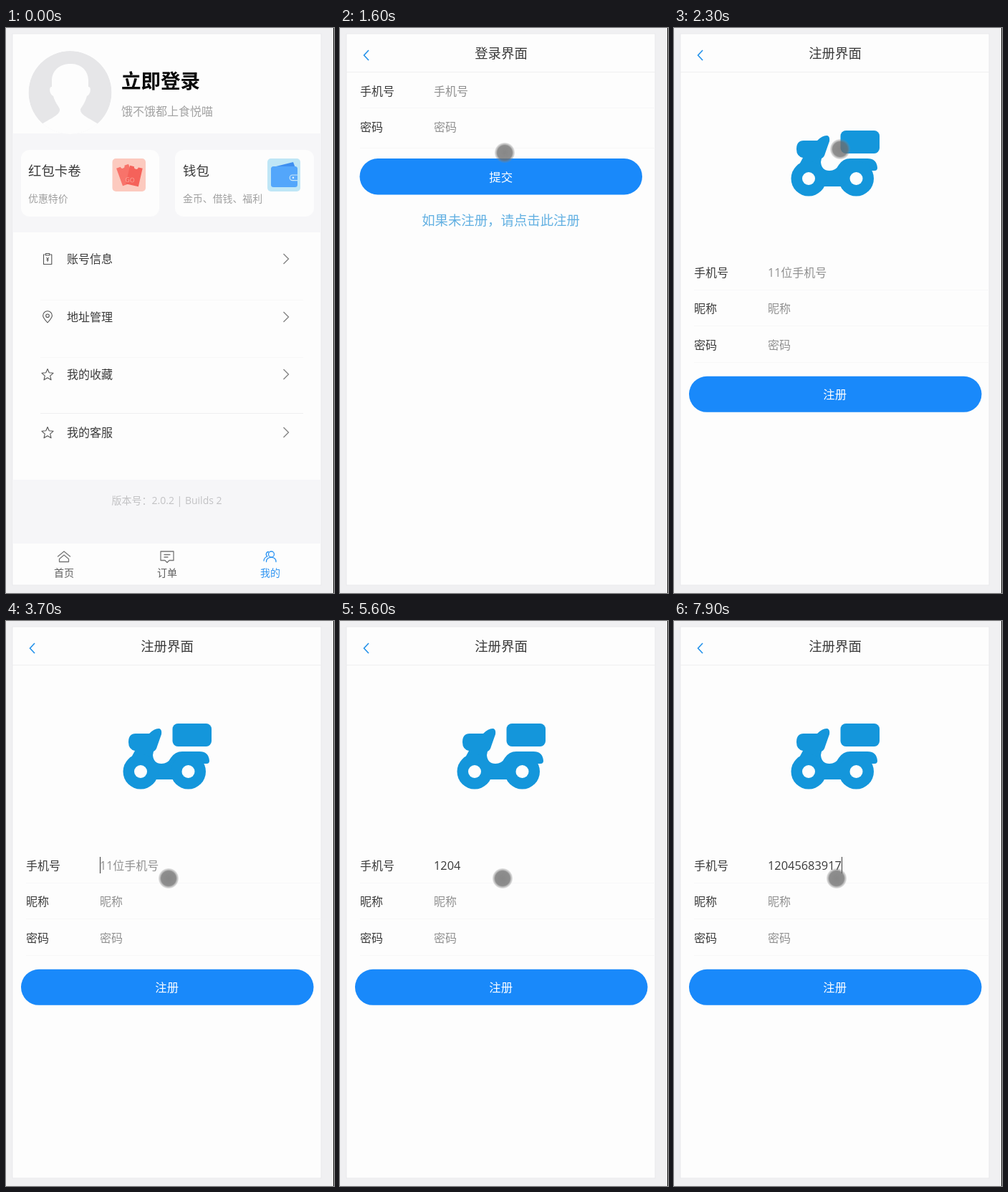
An HTML page that plays this animation: 458x788 px, repeating every 8000 ms.

```html
<!DOCTYPE html>
<html lang="zh-CN">
<head>
<meta charset="utf-8">
<title>登录与注册</title>
<style>
html, body { margin: 0; width: 100%; height: 100%; overflow: hidden; background: #f0f0f2; }
svg { display: block; width: 100vw; height: 100vh; }
text { font-family: "Open Sans", "Noto Sans CJK SC", "Noto Sans CJK", sans-serif; font-size: 16px; fill: #3a3a3a; }
.mid { text-anchor: middle; }
.white { fill: #fdfdfd; }
.line { stroke: #f7f7f8; fill: none; }
.head { stroke: #efeff0; fill: none; }
.title { font-size: 18.4px; }
.hint { fill: #909090; }
.small { font-size: 13.9px; fill: #a0a0a0; }
.icon { fill: none; stroke: #555; stroke-width: 1.1; stroke-linejoin: round; }
.chev { fill: none; stroke: #858585; stroke-width: 1.4; }
.back { fill: none; stroke: #2492ea; stroke-width: 1.6; }
.tab { fill: none; stroke: #777; stroke-width: 1.3; stroke-linejoin: round; stroke-linecap: round; }
.tabText { font-size: 14px; text-anchor: middle; fill: #606060; }
.button { fill: #1989fa; }
.buttonText { fill: #fff; font-weight: 500; font-size: 16.4px; text-anchor: middle; }
.page { visibility: hidden; }
</style>
</head>
<body>
<svg viewBox="0 0 458 788" preserveAspectRatio="none">
  <defs>
    <radialGradient id="dot">
      <stop offset="0" stop-color="#6a6a6a" stop-opacity=".8"/>
      <stop offset=".74" stop-color="#6e6e6e" stop-opacity=".78"/>
      <stop offset=".84" stop-color="#777" stop-opacity=".5"/>
      <stop offset="1" stop-color="#888" stop-opacity=".2"/>
    </radialGradient>
    <clipPath id="face"><circle cx="89.5" cy="90" r="58"/></clipPath>
    <path id="chev" d="M0 -7L7 0L0 7"/>
    <path id="star" d="M0 -8L2.3 -2.7L8 -2.2L3.7 1.7L5 7.3L0 4.3L-5 7.3L-3.7 1.7L-8 -2.2L-2.3 -2.7Z"/>
    <path id="ticket" d="M-9 -13H-3A3 3 0 0 0 3 -13H9V13H-9Z"/>
    <g id="bar">
      <path class="head" d="M9 61.5H440"/>
      <path class="back" d="M40 31L33.500 38L40 45"/>
    </g>
  </defs>

  <rect width="458" height="788" fill="#f0f0f2"/>
  <rect class="white" x="9" y="8" width="431" height="769" stroke="#e6e6e8" stroke-width=".7"/>
  <rect x="457" width="1" height="788" fill="#1c1c1c"/>

  <g class="page" id="home">
    <path fill="#f6f6f8" d="M9 147H440V285H9ZM9 630H440V719H9Z"/>
    <g clip-path="url(#face)">
      <circle cx="89.5" cy="90" r="58" fill="#e6e6e8"/>
      <path class="white" d="M90 50C76 50 65 58 64 72V82C59 82 61 93 66 95C69 105 73 108 75 113C76 121 64 125 50 134V150H129V134C115 125 103 121 104 113C107 108 110 105 113 95C118 93 120 82 115 82V72C114 58 104 50 90 50Z"/>
    </g>
    <text x="161" y="84" style="font-size:27.5px;font-weight:700;fill:#0a0a0a">立即登录</text>
    <text x="161" y="121.500" style="fill:#a2a2a2">饿不饿都上食悦喵</text>

    <rect class="white" x="21" y="170" width="193" height="93" rx="12"/>
    <text class="title" x="31" y="206">红包卡卷</text>
    <text class="small" x="31" y="243">优惠特价</text>
    <rect x="148.500" y="182" width="46.500" height="46" rx="5" fill="#fccabf"/>
    <use href="#ticket" transform="translate(167 205) rotate(-20)" fill="#f8736a"/>
    <use href="#ticket" transform="translate(179 206.500) rotate(13)" fill="#f5625a"/>
    <text x="173" y="215" transform="rotate(4 173 212)" class="mid" style="font-size:9px;fill:#fba59b">GO</text>

    <rect class="white" x="236" y="170" width="194" height="93" rx="12"/>
    <text class="title" x="247" y="206">钱包</text>
    <text class="small" x="247" y="243">金币、借钱、福利</text>
    <rect x="365" y="182" width="46" height="46" rx="5" fill="#bfe6f6"/>
    <path d="M373 194L401 187L404 195Z" fill="#3f8ff0"/>
    <rect x="370" y="193" width="37" height="29" rx="3.500" fill="#53a6fb"/>
    <path d="M407 205H400A3.800 3.800 0 0 0 400 212.600H407" fill="#5cabfb" stroke="#c8e6f8" stroke-width="1.200"/>
    <circle cx="401" cy="208.800" r="1.200" fill="#e6f3fc"/>

    <path class="line" d="M48 379.500H415M48 459.500H415"/>
    <path class="head" d="M48 537.500H415"/>
    <g class="icon">
      <path d="M54.500 316H52.500V329.500H63.800V316H61.500M55.500 314.500H60.700V317H55.500ZM56.500 320L58.100 322.500L59.700 320M58.100 322.500V326M56.500 323.500H59.700"/>
      <path d="M58 411C53.500 406 51.600 403.500 51.600 401.200A6.400 6.400 0 0 1 64.400 401.200C64.400 403.500 62.500 406 58 411Z"/>
      <circle cx="58" cy="401.300" r="2.300"/>
      <use href="#star" x="58" y="483.500"/>
      <use href="#star" x="58" y="564.500"/>
    </g>
    <text x="85" y="328">账号信息</text>
    <text x="85" y="409">地址管理</text>
    <text x="85" y="489">我的收藏</text>
    <text x="85" y="570">我的客服</text>
    <g class="chev">
      <use href="#chev" x="387.500" y="322"/><use href="#chev" x="387.500" y="403"/>
      <use href="#chev" x="387.500" y="483"/><use href="#chev" x="387.500" y="564"/>
    </g>
    <text class="mid" x="224.500" y="664" style="font-size:14px;fill:#c2c2c4">版本号：2.0.2 | Builds 2</text>

    <g class="tab">
      <path d="M72.500 737L81 730L89.500 737M74.500 740.500V744.500H87.500V740.500L81 735Z"/>
      <path d="M216 730H234V742.500H228L225 745.500L222 742.500H216ZM221 734.500H229M221 738H226"/>
    </g>
    <g class="tab" style="stroke:#2f95f2">
      <circle cx="370.500" cy="734" r="4"/>
      <path d="M363.500 744.500C363.500 740.500 366.500 738.300 370.500 738.300S377 740.500 377 744.500M366.500 730.500A3.500 3.500 0 0 0 365 737C362 738 360.300 740 360 743"/>
    </g>
    <text class="tabText" x="81" y="765">首页</text>
    <text class="tabText" x="225" y="765">订单</text>
    <text class="tabText" x="369" y="765" style="fill:#2f95f2">我的</text>
  </g>

  <g class="page" id="login">
    <use href="#bar"/>
    <text class="title mid" x="225" y="42">登录界面</text>
    <text x="28" y="94">手机号</text><text class="hint" x="131" y="94">手机号</text>
    <path class="line" d="M28 111.500H440M28 167.500H440"/>
    <text x="28" y="144">密码</text><text class="hint" x="131" y="144">密码</text>
    <rect class="button" x="27.500" y="182" width="394.500" height="50.500" rx="25.250"/>
    <text class="buttonText" x="224.700" y="213.500">提交</text>
    <text class="title mid" x="224.500" y="275" style="fill:#62b0e2">如果未注册，请点击此注册</text>
  </g>

  <g class="page" id="signup">
    <use href="#bar"/>
    <text class="title mid" x="225" y="42">注册界面</text>
    <g fill="#1496db">
      <rect x="232.500" y="143" width="54.500" height="32" rx="7.500"/>
      <path d="M180 181Q171 179 171 169Q171 157 181 157H200Q207 150 213 150Q218 150 217 158L211 175Q210 180 206 182L205 187Q206 199 217 199Q226 199 230 191Q236 182 246 182H270Q283 182 284 195Q284 199 280 199H270V221H188L174 192Z"/>
      <circle cx="188" cy="210" r="24.500"/>
      <circle cx="254.500" cy="210" r="24.500"/>
      <circle class="white" cx="188" cy="210" r="9"/>
      <circle class="white" cx="254.500" cy="210" r="9"/>
    </g>
    <text x="28" y="347">手机号</text>
    <text class="hint" id="hint" x="131" y="347">11位手机号</text>
    <text id="phone" x="131" y="347" style="font-size:16.370px"></text>
    <rect id="caret" y="329" width="1" height="23" fill="#3a3a3a"/>
    <text x="28" y="397">昵称</text><text class="hint" x="131" y="397">昵称</text>
    <path class="line" d="M28 365.500H440M28 415.500H440M28 466.500H440"/>
    <text x="28" y="448">密码</text><text class="hint" x="131" y="448">密码</text>
    <rect class="button" x="21" y="485.800" width="408.500" height="50" rx="25"/>
    <text class="buttonText" x="224.700" y="517">注册</text>
  </g>

  <circle id="cursor" r="14" fill="url(#dot)"/>
</svg>
<script>
const LOOP = 8000, STEP = 100;
const number = "12045683917";
const keyTimes = [4100, 4300, 4700, 5600, 5800, 6100, 6400, 6800, 7300, 7500, 7900];
const caretOn = [[2900, 3300], [3700, 5300], [5800, LOOP]];
// time, x, y
const route = [
  [100, 290, 778], [400, 250, 470], [700, 210, 150], [900, 200, 95], [1200, 200, 95],
  [1600, 230, 174], [1900, 232, 266], [2000, 232, 266], [2300, 232, 169],
  [2800, 230, 342], [3200, 227, 359], [LOOP, 227, 359]
];
const el = id => document.getElementById(id);
const show = (id, on) => { el(id).style.visibility = on ? "visible" : "hidden"; };

function place(t) {
  const i = Math.max(1, route.findIndex(p => p[0] >= t));
  const [t0, x0, y0] = route[i - 1], [t1, x1, y1] = route[i];
  const k = (t - t0) / (t1 - t0);
  el("cursor").setAttribute("cx", x0 + (x1 - x0) * k);
  el("cursor").setAttribute("cy", y0 + (y1 - y0) * k);
}

function draw(t) {
  const signup = t >= 2000;
  show("home", t < 1100);
  show("login", t >= 1100 && !signup);
  show("signup", signup);
  show("cursor", t >= 100);
  place(t);

  const typed = keyTimes.filter(k => t >= k).length;
  el("phone").textContent = number.slice(0, typed);
  show("hint", signup && !typed);
  show("caret", caretOn.some(([a, b]) => t >= a && t < b));
  el("caret").setAttribute("x", 131 + typed * 9.36);
}

const start = performance.now();
function tick(now) {
  const t = Math.max(0, now - start) % LOOP;
  draw(Math.floor(t / STEP) * STEP);
  requestAnimationFrame(tick);
}
draw(0);
requestAnimationFrame(tick);
</script>
</body>
</html>
```
